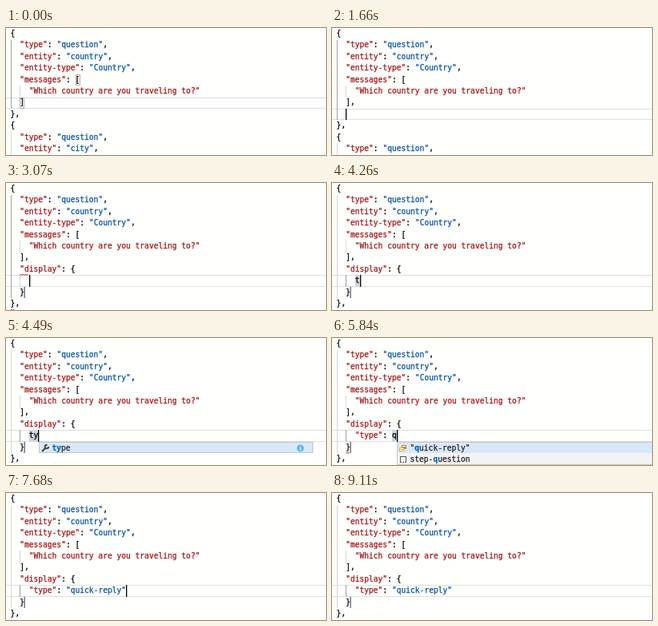
An HTML page with a canvas for the animation above (9740 ms loop, 400x159 px).

```html
<!DOCTYPE html>
<html lang="en">
<head>
<meta charset="utf-8">
<title>JSON completion</title>
<style>
html, body { margin: 0; width: 100%; height: 100%; overflow: hidden; background: #fffffe; }
canvas { display: block; width: 400px; height: 159px; }
</style>
</head>
<body>
<canvas></canvas>
<script>
const LOOP = 9740, W = 400, H = 159;
const CHAR = 5.78, ROW = 14.4, LEFT = 5.6;
const FONT = '9.6px "DejaVu Sans Mono", monospace';
const RED = '#a31515', BLUE = '#0451a5', PAPER = '#fffffe';

const canvas = document.querySelector('canvas');
const ratio = window.devicePixelRatio || 1;
canvas.width = W * ratio;
canvas.height = H * ratio;
const ctx = canvas.getContext('2d');
ctx.scale(ratio, ratio);

const colX = col => LEFT + col * CHAR;
const rowY = row => Math.round(row * ROW + 0.2);
const between = (t, from, to) => t >= from && t < to;

const HEAD = [
  '{',
  '  "type": "question",',
  '  "entity": "country",',
  '  "entity-type": "Country",',
  '  "messages": [',
  '    "Which country are you traveling to?"'
];
const TAIL = ['},', '{', '  "type": "question",', '  "entity": "city",'];
const block = body => ['  ],', '  "display": {', body, '  }', ...TAIL];

const displayMenu = { x: 23, right: 367, row: 8, match: 'd', icons: ['wrench', 'wrench'],
  items: ['display', 'entity-display'], infoX: 350 };
const typeMenu = (x, match) => ({ x, right: 384, row: 9, match, icons: ['wrench'],
  items: ['type'], infoX: 368 });
const replyMenu = { x: 81, right: 425, row: 9, match: 'q', icons: ['enum', 'snippet'],
  items: ['"quick-reply"', 'step-question'] };

// Editing steps: caret position, text below the head, typed placeholder, menu.
const STEPS = [
  { at: 0, row: 6, col: 3, lines: ['  ]', ...TAIL] },
  { at: 1600, row: 6, col: 4, lines: ['  ],', ...TAIL] },
  { at: 1660, row: 7, col: 2, lines: ['  ],', '', ...TAIL] },
  { at: 2370, row: 7, col: 3, lines: ['  ],', '  d', ...TAIL], menu: displayMenu },
  { at: 2900, row: 8, col: 4, lines: block('') },
  { at: 4260, row: 8, col: 5, lines: block('    t'), mark: 4 },
  { at: 4320, row: 8, col: 5, lines: block('    t'), mark: 4, menu: typeMenu(41, 't') },
  { at: 4430, row: 8, col: 6, lines: block('    ty'), mark: 4, menu: typeMenu(41, 'ty') },
  { at: 4900, row: 8, col: 12, lines: block('    "type": ') },
  { at: 5840, row: 8, col: 13, lines: block('    "type": q'), mark: 12, menu: replyMenu },
  { at: 6670, row: 8, col: 25, lines: block('    "type": "quick-reply"') }
];

// The caret starts hidden and flips at each of these times.
const CARET_TOGGLES = [360, 830, 1300, 2190, 2370, 3550, 4090, 5490, 5840,
  6430, 6670, 7140, 7680, 8160, 8630, 9110];

// Error underlines: from, to, row, column, length
const ERRORS = [
  [2190, 2900, 6, 3, 1],
  [3070, 3610, 7, 2, 2],
  [3070, 3610, 10, 0, 1],
  [5080, 6430, 9, 2, 1]
];

function rect(x, y, w, h, color) {
  ctx.fillStyle = color;
  ctx.fillRect(x, y, w, h);
}

function frame(x, y, w, h, color) {
  ctx.strokeStyle = color;
  ctx.lineWidth = 1;
  ctx.strokeRect(x + 0.5, y + 0.5, w - 1, h - 1);
}

function path(points, color, width) {
  ctx.strokeStyle = color;
  ctx.lineWidth = width;
  ctx.beginPath();
  points.forEach(([x, y]) => ctx.lineTo(x, y));
  ctx.stroke();
}

// A hairline stroke gives the text its slightly heavy weight.
function text(str, x, baseline, color, weight = '') {
  ctx.font = `${weight} ${FONT}`;
  ctx.fillStyle = ctx.strokeStyle = color;
  ctx.lineWidth = 0.25;
  ctx.fillText(str, x, baseline);
  ctx.strokeText(str, x, baseline);
}

function drawCode(line, row) {
  for (const token of line.matchAll(/"[^"]*"|[^"\s]+/g)) {
    const before = line.slice(0, token.index);
    const color = token[0][0] !== '"' ? '#000' : before.includes(':') ? BLUE : RED;
    text(token[0], colX(token.index), row * ROW + 10, color);
  }
}

function drawGuides(lines, t) {
  const outer = t < 4260 ? '#a0a0a0' : '#d6d6d6';
  const close = lines.indexOf('},');
  lines.forEach((line, row) => {
    const y = rowY(row), h = rowY(row + 1) - y;
    if (row > 0 && row < close) rect(6, y, 1, h, outer);
    if (row > close + 1) rect(6, y, 1, h, '#d6d6d6');
    if (row === 5) rect(17, y, 1, h, '#d6d6d6');
    if (t >= 2900 && row === 8) rect(17, y, 1, h, t < 4260 ? '#d6d6d6' : '#a0a0a0');
  });
}

function drawSquiggle(row, col, length) {
  const points = [];
  const y = rowY(row + 1);
  for (let x = 0; x <= length * CHAR; x += 1.5) {
    points.push([colX(col) + x, y + (points.length % 2 ? -1 : 0.8)]);
  }
  path(points, '#e51400', 0.9);
}

function drawIcon(kind, x, y) {
  if (kind === 'wrench') {
    path([[x + 1, y + 9], [x + 5.5, y + 4.5]], '#424242', 2.2);
    ctx.lineWidth = 1.9;
    ctx.beginPath();
    ctx.arc(x + 6.8, y + 3.2, 2.2, -0.1, Math.PI * 1.6);
    ctx.stroke();
  } else if (kind === 'enum') {
    rect(x + 3, y + 1, 6, 5, '#c98a1b');
    rect(x + 4, y + 2, 4, 1, '#fff');
    rect(x, y + 4, 6, 5, '#e0ae58');
    rect(x + 1, y + 5, 4, 1, '#fff');
    rect(x + 1, y + 7, 4, 1, '#fff');
  } else {
    frame(x + 1, y + 1, 8, 8, '#555');
    rect(x + 3, y + 8, 1, 1, '#f3f3f3');
    rect(x + 6, y + 8, 1, 1, '#f3f3f3');
  }
}

function drawInfo(x, y) {
  ctx.fillStyle = '#5bb5ee';
  ctx.beginPath();
  ctx.arc(x, y, 4.4, 0, Math.PI * 2);
  ctx.fill();
  rect(x - 0.6, y - 2.6, 1.2, 1.2, '#fff');
  rect(x - 0.6, y - 0.7, 1.2, 3.3, '#fff');
}

function drawMenu({ x, right, row, match, icons, items, infoX }) {
  const y = rowY(row), w = right - x, h = rowY(row + items.length) - y;
  rect(x, y, w, h, '#f3f3f3');
  rect(x, y, w, rowY(row + 1) - y, '#d9e8f8');
  frame(x, y, w, h, '#c4c8cc');
  items.forEach((item, i) => {
    const start = item.indexOf(match), end = start + match.length;
    const draw = (from, to, color, weight) =>
      text(item.slice(from, to), x + 16.5 + from * CHAR, (row + i) * ROW + 11.3, color, weight);
    drawIcon(icons[i], x + 3, rowY(row + i) + 3);
    draw(0, start, '#222');
    draw(start, end, '#0066bf', 'bold');
    draw(end, item.length, '#222');
  });
  if (infoX) drawInfo(infoX, y + 8);
}

function drawBracket(row, col) {
  const x = Math.round(colX(col)), y = rowY(row);
  rect(x, y, 6, 14, '#f0f3f0');
  frame(x, y, 6, 14, '#b4b4b4');
}

function render(t) {
  const step = STEPS.findLast(s => t >= s.at);
  const lines = [...HEAD, ...step.lines];
  const top = rowY(step.row), bottom = rowY(step.row + 1);

  rect(0, 0, W, H, PAPER);
  rect(0, top, W, 1, '#dedede');
  rect(0, bottom - 1, W, 1, '#dedede');
  drawGuides(lines, t);
  if (t < 1600) {
    drawBracket(4, 14);
    drawBracket(6, 2);
  }
  if (step.mark) {
    rect(colX(step.mark), top, (step.col - step.mark) * CHAR, bottom - top, '#ced6e0');
  }
  lines.forEach(drawCode);
  if (t >= 2960) rect(22.5, rowY(9), 1.3, 14, '#536580');
  for (const [from, to, row, col, length] of ERRORS) {
    if (between(t, from, to)) drawSquiggle(row, col, length);
  }
  if (step.menu) drawMenu(step.menu);
  if (CARET_TOGGLES.filter(at => t >= at).length % 2) {
    rect(Math.round(colX(step.col)), top, 1.3, bottom - top, '#000');
  }
}

const origin = performance.now();
function tick() {
  render((performance.now() - origin) % LOOP);
  requestAnimationFrame(tick);
}
tick();
</script>
</body>
</html>
```
